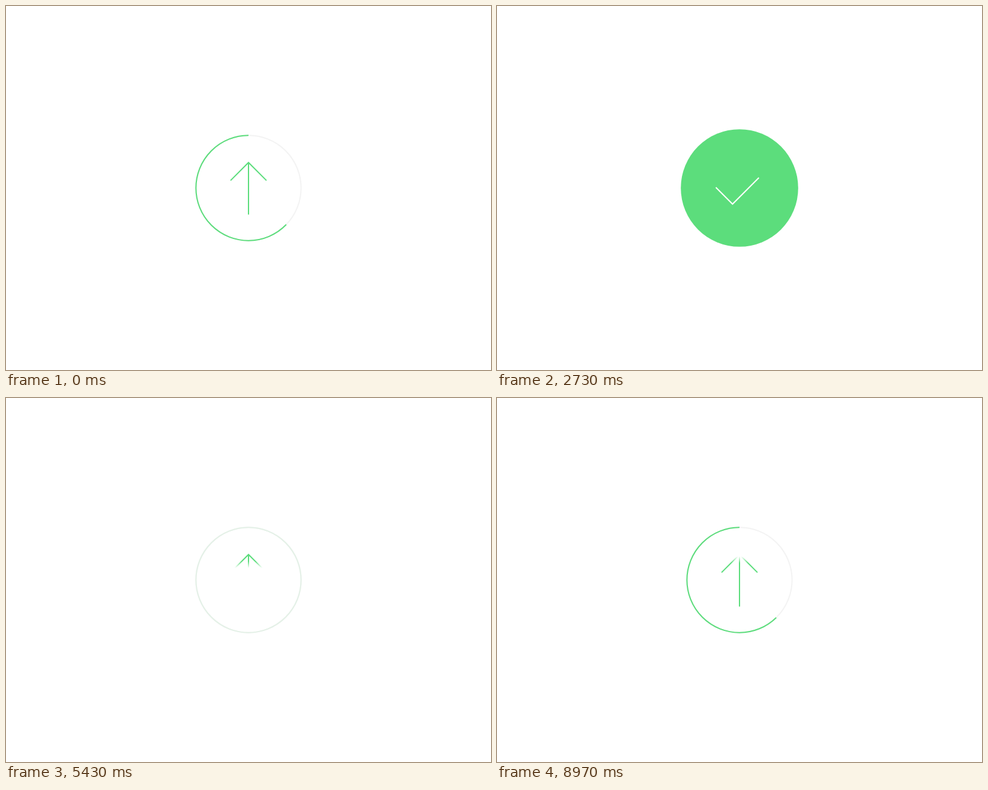
An HTML page with a canvas for the animation above (9 s loop, 800 by 600 pixels).

```html
<!DOCTYPE html>
<html lang="en">
<head>
<meta charset="utf-8">
<title>Upload progress</title>
<style>
  html, body { margin: 0; width: 100%; height: 100%; overflow: hidden; background: #fff; }
  canvas { display: block; width: 800px; height: 600px; }
</style>
</head>
<body>
<canvas id="stage" width="800" height="600"></canvas>
<script>
const ctx = document.getElementById('stage').getContext('2d');
const LOOP = 9000, STEP = 30, CYCLE = 2250;
const CX = 400, CY = 300, RING = 86.7, DISC = 87.5;
const GREEN = [92, 221, 124], TRACK = [243, 243, 243];
const FEATHER = 11, SPEED = 0.495;

const clamp = (v, lo = 0, hi = 1) => Math.min(hi, Math.max(lo, v));
const span = (t, from, to) => clamp((t - from) / (to - from));
const mix = (a, b, k) => a + (b - a) * k;
const rgb = (c, a = 1) => `rgba(${c.map(Math.round).join(',')},${a})`;

const linear = k => k;
const easeIn = k => k * k;
const outQuart = k => 1 - (1 - k) ** 4;
const outBack = k => 1 + 3.4 * (k - 1) ** 3 + 2.4 * (k - 1) ** 2;

// Cubic bezier (.33, 0, .35, 1), solved by bisection
function glide(x) {
  let lo = 0, hi = 1;
  for (let i = 0; i < 24; i++) {
    const s = (lo + hi) / 2, r = 1 - s;
    if (0.99 * r * r * s + 1.05 * r * s * s + s * s * s < x) lo = s; else hi = s;
  }
  return lo * lo * (3 - 2 * lo);
}

// Progress moves: start, end, from, to, easing; times run from 5820 past the loop end
const MOVES = [
  [5805, 7660, 0, 0.36, glide],
  [8060, 9370, 0.36, 0.65, glide],
  [9555, 10470, 0.65, 0.957, glide],
  [10470, 11190, 0.957, 0.967, linear],
  [11190, 11415, 0.967, 1, easeIn]
];

function progress(t) {
  const u = t < 5490 ? t + LOOP : t;
  let p = 0;
  for (const [start, end, from, to, ease] of MOVES) {
    if (u >= start) p = mix(from, to, ease(span(u, start, end)));
  }
  return p;
}

function line(points, style) {
  ctx.beginPath();
  points.forEach(([x, y]) => ctx.lineTo(x, y));
  ctx.strokeStyle = style;
  ctx.lineWidth = 2;
  ctx.stroke();
}

function ring(part, color) {
  if (part <= 0) return;
  const top = -Math.PI / 2;
  ctx.beginPath();
  ctx.arc(CX, CY, RING, top, top - part * 2 * Math.PI, true);
  ctx.strokeStyle = color;
  ctx.lineWidth = 2;
  ctx.stroke();
}

// The arrow is wiped in and out upwards behind a soft edge
function arrow(t) {
  const m = t % CYCLE;
  const entering = m > 1500;
  if (m >= 990 && m < 2040) return;
  const edge = entering ? 276 - SPEED * (m - 2190) : 295 - SPEED * (m - 900);
  const fade = ctx.createLinearGradient(0, entering ? edge : edge - FEATHER,
                                        0, entering ? edge + FEATHER : edge);
  fade.addColorStop(0, rgb(GREEN, entering ? 0 : 1));
  fade.addColorStop(1, rgb(GREEN, entering ? 1 : 0));
  line([[370.4, 287.6], [400, 258], [429.6, 287.6]], fade);
  line([[400, 258], [400, 343.8]], fade);
}

function check(t) {
  const pts = [[361, 299], [388.5, 326.5], [441, 274]];
  const len = (a, b) => Math.hypot(b[0] - a[0], b[1] - a[1]);
  const total = len(pts[0], pts[1]) + len(pts[1], pts[2]);
  const k = glide(span(t, 2490, 2850));
  if (k <= 0) return;
  if (k < 1) ctx.setLineDash([total * k, total * 2]);
  line(pts, '#fff');
  ctx.setLineDash([]);
}

function disc(t) {
  if (t <= 2400 || t >= 5205) return;
  const scale = t < 4890 ? outBack(span(t, 2400, 2850))
                         : 1 - outQuart(span(t, 4890, 5205));
  ctx.save();
  ctx.beginPath();
  ctx.arc(CX, CY, DISC * Math.max(0, scale), 0, 2 * Math.PI);
  ctx.fillStyle = rgb(GREEN);
  ctx.fill();
  ctx.clip();
  check(t);
  ctx.restore();
}

function draw(t) {
  ctx.fillStyle = '#fff';
  ctx.fillRect(0, 0, 800, 600);
  ring(1, rgb(TRACK));
  if (t >= 2400 && t < 5490) {
    const k = span(t, 4890, 5490);
    ring(1, rgb(GREEN.map((c, i) => mix(c, TRACK[i], k))));
  } else {
    ring(progress(t), rgb(GREEN));
  }
  arrow(t);
  disc(t);
}

let begin = null;
function tick(now) {
  if (begin === null) begin = now;
  const t = (now - begin) % LOOP;
  draw(Math.floor(t / STEP) * STEP);
  requestAnimationFrame(tick);
}
draw(0);
requestAnimationFrame(tick);
</script>
</body>
</html>
```
